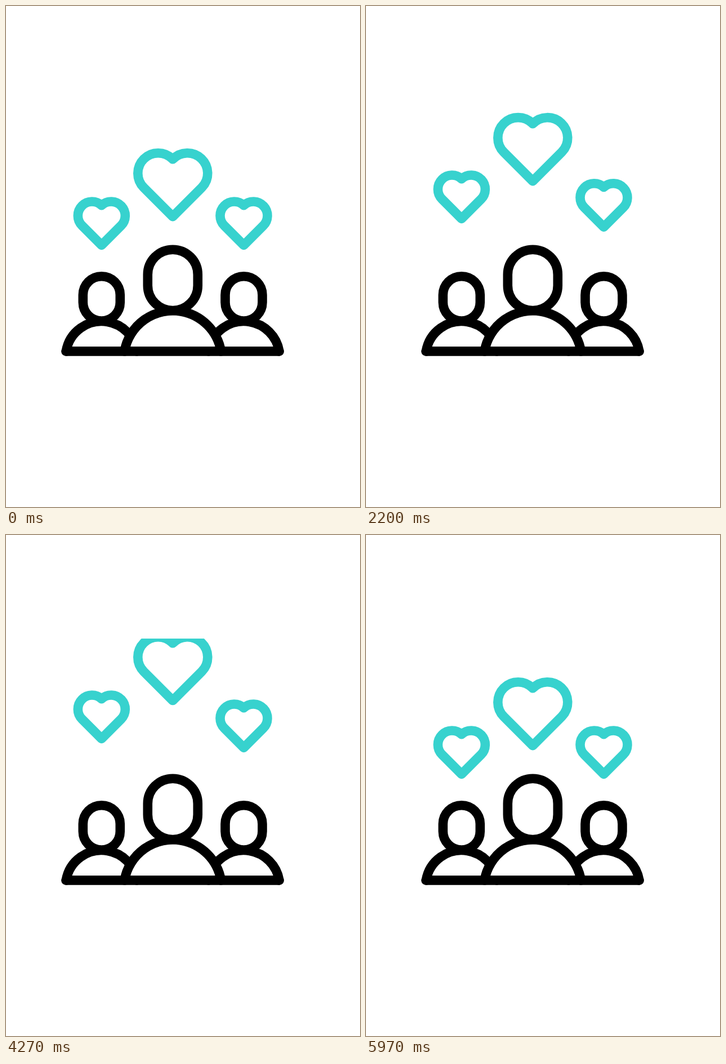
Animation, 629 px wide and 890 px high, one loop 6.01 s. Source, as an HTML page with a canvas:

```html
<!DOCTYPE html>
<html lang="en">
<head>
<meta charset="utf-8">
<title>People and hearts</title>
<style>
  html, body { margin: 0; width: 100%; height: 100%; overflow: hidden; background: #fff; }
  canvas { display: block; }
</style>
</head>
<body>
<canvas id="stage" width="629" height="890"></canvas>
<script>
const ctx = document.getElementById('stage').getContext('2d');
const LOOP = 6010, CYCLE = 2000, STAGGER = 40, BASE = 613.4, CLIP_TOP = 184;
const TEAL = '#37d2ce';

// order: time offset in staggers; heart lobes have radius r and sit dx from the axis
const sideHeart = { y: 372.5, r: 25, dx: 17 };
const sideHead = { top: 480.3, bottom: 559.5, r: 33 };
const sideBody = { r: 63.9, y: 624 };
const people = [
  { order: 1, x: 169.8, heart: sideHeart, head: sideHead, body: sideBody },
  { order: 2, x: 422.5, heart: sideHeart, head: sideHead, body: sideBody },
  { order: 0, x: 296.3, heart: { y: 297.2, r: 36, dx: 26 },
    head: { top: 432.7, bottom: 541, r: 44.5 }, body: { r: 87, y: 628.2 } }
];

// smooth bump 0 -> 1 -> 0 over the given span
function bump(t, start, length) {
  const x = (t - start) / length;
  return x > 0 && x < 1 ? Math.sin(Math.PI * x) ** 2 : 0;
}

// uneven holds: five poses, 40 ms of motion each, per 200 ms
function poseTime(t) {
  const rest = t % 200;
  const step = [70, 100, 130, 170].filter(s => rest >= s).length;
  return t - rest + step * 40;
}

function drawHeart({ x, heart: { y, r, dx } }, shift, scale, alpha) {
  const q = Math.PI / 4, notch = Math.acos(dx / r);
  const tip = r * Math.SQRT2 + dx, mid = (tip - r) / 2;
  ctx.save();
  ctx.globalAlpha = alpha;
  ctx.translate(x, y + mid + shift);
  ctx.scale(scale, scale);
  ctx.translate(0, -mid);
  ctx.beginPath();
  ctx.moveTo(0, tip);
  ctx.arc(-dx, 0, r, 3 * q, 2 * Math.PI - notch);
  ctx.arc(dx, 0, r, Math.PI + notch, 2 * Math.PI + q);
  ctx.closePath();
  ctx.strokeStyle = TEAL;
  ctx.stroke();
  ctx.restore();
}

function drawHearts(person, t) {
  const delay = person.order * STAGGER;
  const rising = t - delay, born = t - 560 - delay;
  if (rising < 700) {
    drawHeart(person, -47 * (Math.max(rising, 0) / 160) ** 1.315, 1, 1);
  }
  if (born > 0) {
    const n = born / 40;
    const pulse = 0.05 * bump(t, 1150, 550);
    drawHeart(person, 126 * 0.43 ** n, 1 - 0.33 ** n + pulse, Math.min(1, born / 400));
  }
}

function drawPerson({ x, order, head, body }, t) {
  const lift = 12 * bump(t, 490 + order * STAGGER, 400);
  const height = BASE - (body.y - body.r);
  const foot = Math.asin((body.y - BASE) / body.r);

  // the shoulders stretch up from the base line
  ctx.save();
  ctx.translate(x, BASE);
  ctx.scale(1, 1 + lift / height);
  ctx.beginPath();
  ctx.arc(0, body.y - BASE, body.r, Math.PI + foot, 2 * Math.PI - foot);
  ctx.restore();
  ctx.fill();
  ctx.stroke();

  ctx.beginPath();
  ctx.roundRect(x - head.r, head.top - lift, head.r * 2, head.bottom - head.top, head.r);
  ctx.fill();
  ctx.stroke();
}

function draw(now) {
  const t = poseTime(Math.min(now % LOOP, 5999)) % CYCLE;
  ctx.fillStyle = '#fff';
  ctx.fillRect(0, 0, 629, 890);
  ctx.lineWidth = 16.6;
  ctx.lineCap = ctx.lineJoin = 'round';

  ctx.save();
  ctx.beginPath();
  ctx.rect(0, CLIP_TOP, 629, 890);
  ctx.clip();
  people.forEach(p => drawHearts(p, t));
  ctx.restore();

  ctx.strokeStyle = '#000';
  people.forEach(p => drawPerson(p, t));
  ctx.beginPath();
  ctx.moveTo(106.5, BASE);
  ctx.lineTo(485.5, BASE);
  ctx.stroke();
}

const start = performance.now();
function tick() {
  draw(performance.now() - start);
  requestAnimationFrame(tick);
}
tick();
</script>
</body>
</html>
```
